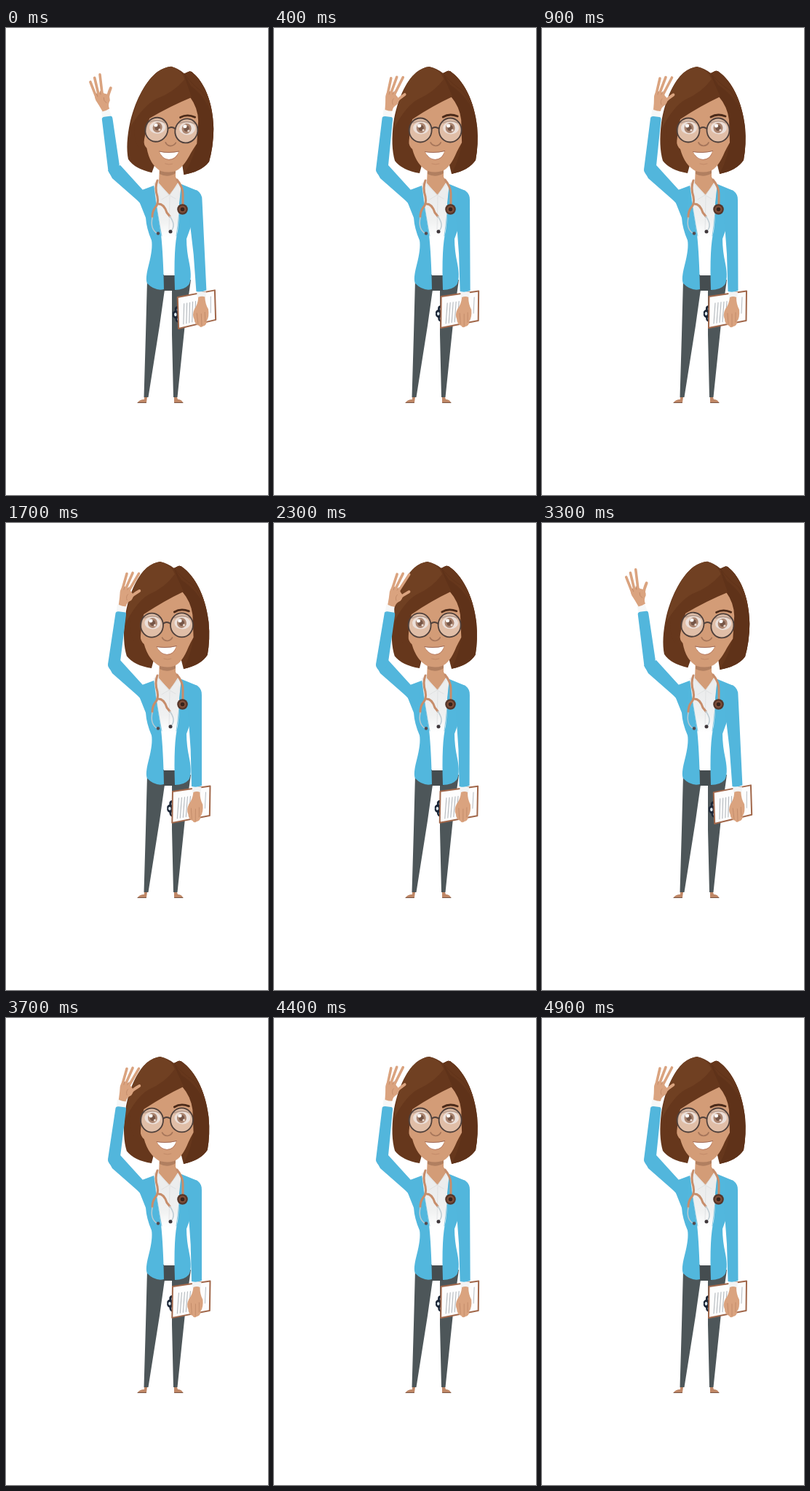
Recreate the animation shown at these times as an HTML page with a canvas. Size 360 px wide and 640 px high, loop 5000 ms.

```html
<!DOCTYPE html>
<html lang="en">
<head>
<meta charset="utf-8">
<title>Waving doctor</title>
<style>
html, body { margin: 0; width: 100%; height: 100%; overflow: hidden; background: #fff; }
canvas { display: block; width: 360px; height: 640px; }
</style>
</head>
<body>
<canvas id="stage" width="360" height="640"></canvas>
<script>
const ctx = document.getElementById('stage').getContext('2d');
const LOOP = 5000, STEP = 100, WAVE = 2000 / 3;
const C = {
  blue: '#52b6dc', coat: '#52b7dd', pants: '#4d5659', skin: '#daa37f', face: '#d39c77',
  shade: '#b17f60', line: '#bf8766', hair: '#66371c', hairLight: '#704022', hairDark: '#5f3219',
  tube: '#c78d6b', frame: '#4f403b', wood: '#a1674a', clip: '#1a2536'
};

function fill(path, color) {
  ctx.fillStyle = color;
  ctx.fill(new Path2D(path));
}

function stroke(path, color, width) {
  ctx.strokeStyle = color;
  ctx.lineWidth = width;
  ctx.stroke(new Path2D(path));
}

function oval(x, y, rx, ry, color) {
  ctx.beginPath();
  ctx.ellipse(x, y, rx, ry, 0, 0, Math.PI * 2);
  ctx.fillStyle = color;
  ctx.fill();
}

function pivot(x, y, degrees, draw) {
  ctx.save();
  ctx.translate(x, y);
  ctx.rotate(degrees * Math.PI / 180);
  ctx.translate(-x, -y);
  draw();
  ctx.restore();
}

// Slants upright lines by lean and level lines by tilt.
function slant(x, y, lean, tilt, draw) {
  ctx.save();
  ctx.translate(x, y);
  ctx.transform(1, tilt, -lean, 1, 0, 0);
  ctx.translate(-x, -y);
  draw();
  ctx.restore();
}

function legs() {
  fill('M194 345 L220 350 L217.5 362 L211 408 L195.5 506 L189.5 506 L192 420 Z', C.pants);
  fill('M228 350 L254 345 Q249 380 246 405 L235.5 506 L230 506 L228 420 Z', C.pants);
  fill('M216 338 H233 V360 H216 Z', '#454d50');
  fill('M190 506 H194 L193 513 H181 Q184 509 190 509 Z', C.line);
  fill('M231 506 H235 L236 509 Q241 509 243 513 H231 Z', C.line);
  stroke('M181 513.5 H192.5 M231.5 513.5 H243', '#7a5544', 1);
}

function torso() {
  const cloth = ctx.createLinearGradient(0, 210, 0, 300);
  cloth.addColorStop(0, '#e8e9ea');
  cloth.addColorStop(0.6, '#f0f1f1');
  cloth.addColorStop(0.85, '#ffffff');
  fill('M203 213 L211 206 L235 206 L242 215 L236 285 L232 339 H217 L214 290 Z', cloth);
  fill('M211 188 H233 V204 L238 213 L225 229 L210 213 Z', C.face);
  fill('M211 192 H233 V199 Q222 206 211 200 Z', C.shade);
  fill('M207 209 L224 229 L214 235 L204 219 Z M238 209 L225 229 L233 234 L241 219 Z', '#eceded');
  stroke('M207 211 L224 229 L239 211 M214 235 L224 229 L233 234 M225 231 L224 280', '#dadcdd', 0.7);
  fill('M187 222 L203 216 Q207 250 213 283 Q216 310 217 358 Q205 361 194 350 Q191 344 196 325 Q202 302 200 291 Q193 275 192 260 L184 240 Z', C.coat);
  fill('M241 214 L263 223 L262 250 Q255 270 248 289 Q248 305 252 323 Q256 344 251 352 Q245 359 232 359 Q230 300 236 278 Q239 255 238 240 Z', C.coat);
  stroke('M203 217 Q208 255 214 285 M241 216 Q238 260 234 285', '#47abd2', 0.6);
}

function stethoscope() {
  stroke('M208 209 Q204 219 208 231 Q210 241 205 246 Q201 251 201 259 M208 241 Q217 240 221 253 L225 258', C.tube, 3);
  stroke('M235 208 Q243 218 243 227 V243', C.tube, 3);
  stroke('M201 260 Q198 275 207 281 M225 258 Q234 270 227 278', '#bccbd2', 1.5);
  oval(242.5, 248.5, 7.3, 7.3, '#55362a');
  oval(242.5, 248.5, 5, 5, '#80503a');
  oval(242.5, 248.5, 2.8, 2.8, '#38241d');
  oval(209, 281.5, 2.2, 2.2, '#544b50');
  oval(226, 279, 2.5, 2.5, '#3f373b');
}

function eye(x, irisX) {
  oval(x, 140, 15.5, 16.5, 'rgba(236,218,208,.55)');
  oval(x + 1, 137, 11, 8.5, '#ece0da');
  oval(irisX, 137, 6.5, 7, '#ab8570');
  oval(irisX, 137, 3.6, 4, '#765647');
  oval(irisX - 2.5, 134, 2.6, 2.4, '#fff');
  oval(irisX + 3, 140, 1.6, 1.6, '#eadbd2');
  stroke(`M${x - 10} 130 Q${x} 125 ${x + 11} 130`, '#b29a8e', 1.6);
  ctx.beginPath();
  ctx.ellipse(x, 140, 15.5, 16.5, 0, 0, Math.PI * 2);
  ctx.strokeStyle = C.frame;
  ctx.lineWidth = 1.8;
  ctx.stroke();
}

function head() {
  fill('M213 53 Q223 55 232 62 L238 59 Q241 58 244 61 C259 72 275 98 279 136 Q281 160 277 181 Q268 195 244 200 L241 188 L203 188 L200 199 Q176 195 166 182 Q160 162 164 130 C169 98 181 73 195 61 Q204 54 213 53 Z', C.hair);
  fill('M232 62 L238 59 Q241 58 244 61 C259 72 275 98 279 136 Q281 160 277 181 Q268 195 244 200 Q258 174 258 148 Q259 111 242 94 Z', C.hairDark);
  fill('M187 118 L243 94 Q255 108 257 126 L258 157 Q254 164 251 170 Q242 192 231 196 Q222 199 211 196 Q196 188 190 166 Q185 162 185 154 Z', C.face);
  fill('M245 94 Q217 107 190 125 Q187 136 185 158 L178 165 Q166 145 173 124 Q200 84 232 65 Z', C.hair);
  fill('M213 53 Q229 58 233 70 Q220 88 197 98 Q181 107 165 137 C169 98 181 73 195 61 Q204 54 213 53 Z', C.hairLight);
  fill('M232 62 L238 59 Q241 58 244 61 C258 71 272 94 276 122 Q268 95 242 78 Z', C.hair);
  stroke('M232 62 Q244 77 259 86 Q269 99 274 119', C.hairDark, 0.8);
  stroke('M232 122 Q241 116.5 252 121', '#4b2a19', 2.8);
  eye(201, 202);
  eye(242, 242);
  stroke('M216.5 138 Q221 134 226.5 138', C.frame, 1.8);
  stroke('M215 157 Q217 161 222 161.5 Q227 161 229 157', '#a5755a', 1.7);
  fill('M208 170 Q221 172 234 169 Q231 179.5 221 180 Q212 180 208 170 Z', '#fff');
  stroke('M207.5 169.5 Q221 172 234.5 168.5', '#a06a58', 1);
  stroke('M210 174 Q214 180 222 180.5 Q230 180 233 173', '#b57a66', 0.8);
  stroke('M217 186 Q222 188 227 186', C.line, 0.8);
}

function wavingArm(s) {
  fill('M140 195 L157 188 L188 222 L203 217 L198 252 L192 250 Q185 240 178 234 L146 206 Z', C.blue);
  pivot(147, 193, -14.3 * s, () => {
    fill('M151 112 L162 113 L163 125 L150 124 Z', '#f6f7f7');
    fill('M149 124 Q149 121 153 121 L161 122 Q164 122 163.5 126 L157 189 L151 206 Q140 201 140 194 Z', C.blue);
    pivot(157, 114, -20 * s, () => {
      stroke('M156.5 93 L162 69 M161 91 L170 67.5', C.skin, 3.6);
      stroke('M166 92 L178.5 68', C.skin, 3.6);
      stroke('M166 104 Q173 96 180.5 91.5', C.skin, 3.8);
      fill('M153 112 Q154 102 154 94 Q155 87 160 87 Q167 87 169 93 Q175 98 170 105 Q164 108 163 114 Q158 114 153 112 Z', C.skin);
      stroke('M159 91 L160 87 M164 91 L166 87 M164 105 Q162 100 165 97', C.line, 0.8);
    });
  });
}

function clipboard() {
  fill('M230 380 Q224 380 225 386 Q221 388 222 391 Q221 395 225 397 Q225 403 231 403 Z', C.clip);
  oval(225.5, 391.5, 1.8, 2.4, '#dbe6ec');
  oval(228.5, 385, 1, 1.6, '#88a4b8');
  oval(228.5, 398, 1, 1.6, '#88a4b8');
  fill('M229.5 368 L281 360.5 L280.5 401 L229 411 Z', '#fdfdfd');
  stroke('M229.5 368 L281 360.5 L280.5 401 L229 411 Z', C.wood, 2);
  for (let i = 0; i < 5; i++) {
    const x = 237 + i * 4;
    stroke(`M${x + 1} ${377 - i * 0.6} L${x - 1} ${405 - i * 0.8}`, '#b3b8bd', 1.1);
  }
  stroke('M275 369 L274 391', '#b8bdc2', 1);
}

function restingArm() {
  fill('M252 220 L263 223 Q269.5 228 269 236 L269.5 360 Q262 363 255.5 361 L254 310 L250 255 Z', C.blue);
  clipboard();
  fill('M256 362 H269 L268 370 H257 Z', '#f2f3f3');
  fill('M258 369 Q263 367 267 369 Q267 379 271 386 Q272 397 268 402 Q268 408 263 409 Q259 412 257 408 Q252 407 251 399 Q248 393 252 385 Q257 379 258 369 Z', C.skin);
  stroke('M255 391 L256 406 M261 392 L261 408 M266 390 L266 403', C.line, 0.8);
}

// Swing is 1 with the arm out to the left, about 0 with it by the hair.
function swing(t) {
  const angle = phase => Math.cos(2 * Math.PI * (phase + 0.03));
  const out = angle(0), near = angle(0.35);
  return (angle(t / WAVE) - near) / (out - near);
}

function draw(t) {
  const s = swing(t);
  ctx.fillStyle = '#fff';
  ctx.fillRect(0, 0, 360, 640);
  ctx.lineCap = ctx.lineJoin = 'round';
  legs();
  torso();
  stethoscope();
  pivot(258, 225, -2.5 * s, restingArm);
  slant(220, 203, 0.093 * s, 0.04 * s, head);
  wavingArm(s);
}

const start = performance.now();
function tick() {
  const t = (performance.now() - start) % LOOP;
  draw(Math.floor(t / STEP) * STEP);
  requestAnimationFrame(tick);
}
tick();
</script>
</body>
</html>
```
